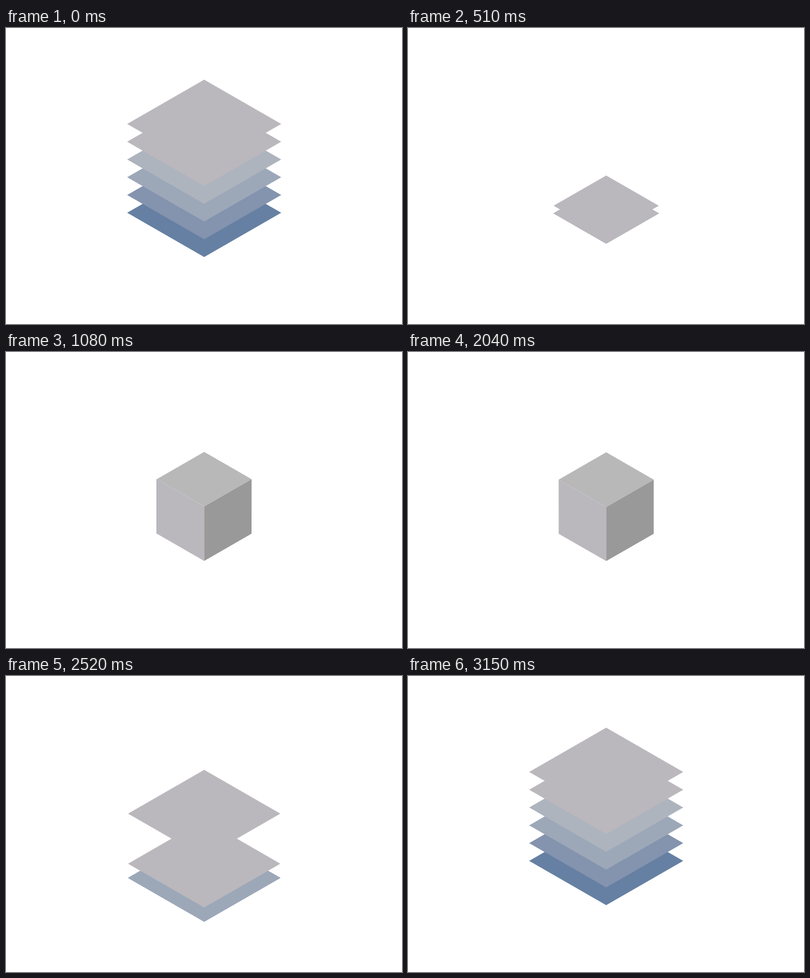
An HTML page with a canvas that plays this animation: 800x600 px, repeating every 3.63 s.

```html
<!DOCTYPE html>
<html lang="en">
<head>
<meta charset="utf-8">
<title>Stack to cube</title>
<style>
  html, body { margin: 0; width: 100%; height: 100%; overflow: hidden; background: #fff; }
  canvas { display: block; width: 800px; height: 600px; }
</style>
</head>
<body>
<canvas id="stage" width="800" height="600"></canvas>
<script>
const ctx = document.getElementById('stage').getContext('2d');
const LOOP = 3630, STEP = 30;
const CX = 400.4, ISO = 1 / Math.sqrt(3);
const WIDE = 155.6, NARROW = 95.7, GAP = 36;

// Listed from the back; level counts up from the floor.
const layers = [
  { level: 1, color: '#6680a3' },
  { level: 2, color: '#8493ae' },
  { level: 4, color: '#aeb4be' },
  { level: 3, color: '#9ca8b8' },
  { level: 5, color: '#bab8bd' },
  { level: 6, color: '#bab8bd' }
];

const clamp = x => Math.min(1, Math.max(0, x));
const quadOut = x => 1 - (1 - x) ** 2;
const quadInOut = x => x < .5 ? 2 * x * x : 1 - 2 * (1 - x) ** 2;
const expoOut = x => x < 1 ? 1 - 2 ** (-10 * x) : 1;
const tween = (t, start, length, ease) => ease(clamp((t - start) / length));

function poly(color, ...points) {
  ctx.fillStyle = color;
  ctx.beginPath();
  for (const [x, y] of points) ctx.lineTo(CX + x, y);
  ctx.fill();
}

function diamond(color, w, y) {
  const h = w * ISO;
  poly(color, [-w, y], [0, y - h], [w, y], [0, y + h]);
}

function lift(t, level) {
  const open = t < 2010
    ? 1 - tween(t, 45 + 60 * (level - 1), 225, quadOut)
    : tween(t, 2446 + 60 * (6 - level), 555, expoOut);
  return open * GAP * level;
}

function cube(w, y, rise) {
  const h = w * ISO, top = y - 2 * h * rise;
  poly('#bab8bd', [-w, top], [0, top + h], [0, y + h], [-w, y]);
  poly('#999999', [w, top], [0, top + h], [0, y + h], [w, y]);
  diamond('#b8b8b8', w, top);
  if (rise > .995) {
    ctx.fillStyle = 'rgba(102, 128, 163, .6)';
    ctx.fillRect(304, top, 1, y - top);
  }
}

function draw(t) {
  const shrink = tween(t, 110, 690, quadOut) - tween(t, 2010, 580, quadInOut);
  const rise = tween(t, 520, 570, quadOut) - tween(t, 2010, 410, quadInOut);
  const w = WIDE + (NARROW - WIDE) * shrink;
  const floor = 300.5 + w * Math.SQRT1_2;

  ctx.clearRect(0, 0, 800, 600);
  if (rise > 0) {
    cube(w, floor, rise);
    return;
  }
  layers
    .map(({ level, color }) => ({ color, z: lift(t, level) }))
    .sort((a, b) => a.z - b.z)
    .forEach(({ color, z }) => diamond(color, w, floor - z));
}

const begin = performance.now();
function tick() {
  const t = (performance.now() - begin) % LOOP;
  draw(Math.floor(t / STEP) * STEP);
  requestAnimationFrame(tick);
}
tick();
</script>
</body>
</html>
```
